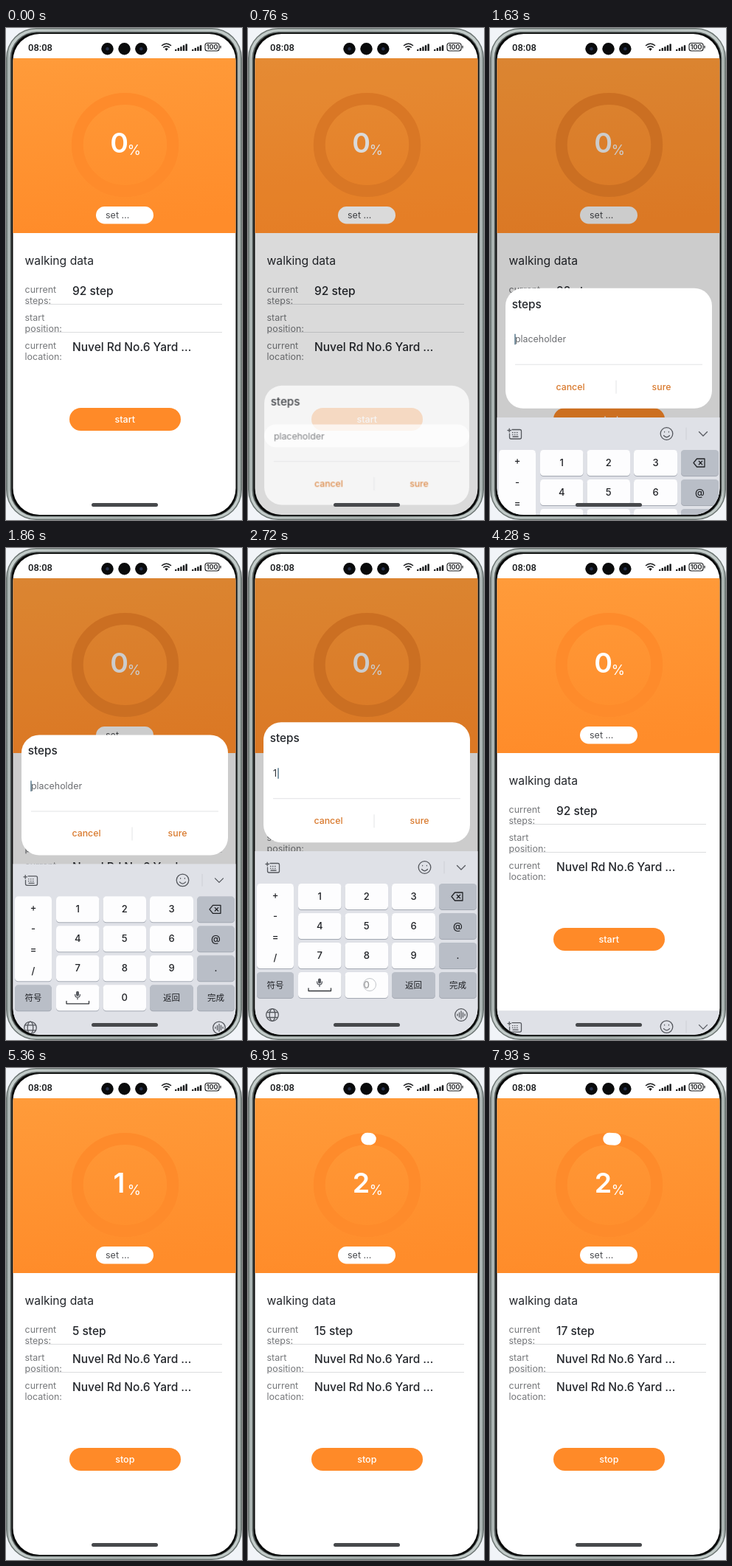
An HTML page for the animation above (8 s loop, 320 by 667 pixels).

```html
<!DOCTYPE html>
<html lang="en">
<head>
<meta charset="utf-8">
<title>Walking tracker</title>
<style>
html, body { margin: 0; width: 100%; height: 100%; overflow: hidden; background: #f1f4f8; }
svg { display: block; width: 320px; height: 667px; }
text { font-family: Inter, Roboto, "Noto Sans", sans-serif; white-space: pre; }
.small { font-size: 12.5px; }
.label { fill: #76787b; }
.value { font-size: 15.5px; font-weight: 500; fill: #23262b; }
.link { font-size: 12.3px; font-weight: 500; fill: #d97a2e; }
.mid { text-anchor: middle; }
.key { font-size: 13px; font-weight: 500; fill: #202226; text-anchor: middle; }
.cjk { font: 500 11.5px "Noto Sans CJK SC", "Noto Sans CJK", sans-serif; }
.clock { font: 500 13px Roboto, "Liberation Sans", sans-serif; fill: #16181a; }
.ico { fill: none; stroke: #55585e; stroke-width: 1.3; stroke-linecap: round; stroke-linejoin: round; }
</style>
</head>
<body>
<svg viewBox="0 0 320 667">
  <defs>
    <linearGradient id="sun" x1="0" y1="0" x2=".12" y2="1">
      <stop offset="0" stop-color="#ff9b3a"/><stop offset="1" stop-color="#ff8c2a"/>
    </linearGradient>
    <linearGradient id="metal">
      <stop offset="0" stop-color="#8f9997"/><stop offset=".012" stop-color="#c5cecc"/>
      <stop offset=".5" stop-color="#a6afad"/>
      <stop offset=".988" stop-color="#c5cecc"/><stop offset="1" stop-color="#8f9997"/>
    </linearGradient>
    <clipPath id="screen"><rect x="9.5" y="8" width="302" height="652" rx="36"/></clipPath>
  </defs>

  <rect width="320" height="667" rx="41" fill="#6d7674"/>
  <rect x="1.5" y="1.5" width="317" height="664" rx="39.5" fill="url(#metal)"/>
  <rect x="5.5" y="5" width="309" height="657.5" rx="36" fill="#59605f"/>
  <rect x="7.5" y="6.5" width="305.5" height="655" rx="34" fill="#080909"/>

  <g clip-path="url(#screen)">
    <rect x="9" y="8" width="303" height="653" fill="#fff"/>
    <rect id="banner" x="9" y="41" width="303" height="237" fill="url(#sun)"/>
    <g id="gauge">
      <ellipse cx="161.5" cy="158.5" rx="64.7" ry="62.5" fill="none" stroke="#fe8b2b" stroke-width="16"/>
      <path id="arc" fill="none" stroke="#fff" stroke-width="16.5" stroke-linecap="round"/>
      <text id="percent" class="mid" x="153.5" y="169" font-size="37.5" font-weight="600" fill="#fff">0</text>
      <text x="164.7" y="171.5" font-size="18.5" fill="#fff">%</text>
      <rect x="122" y="242" width="78" height="23.5" rx="11.7" fill="#fff"/>
      <text class="small" x="135" y="258" fill="#4a4c50">set …</text>
    </g>

    <text x="25.5" y="320.5" font-size="15.7" fill="#23262b">walking data</text>
    <path d="M26 374.5H293M26 412.5H293" stroke="#dcdddf"/>
    <g class="small label">
      <text x="25.5" y="359">current</text><text x="25.5" y="373.5">steps:</text>
      <text x="25.5" y="397">start</text><text x="25.5" y="411.5">position:</text>
      <text x="25.5" y="435">current</text><text x="25.5" y="449.5">location:</text>
    </g>
    <text id="steps" class="value" x="90" y="362">92 step</text>
    <text id="origin" class="value" x="90" y="400"></text>
    <text id="place" class="value" x="90" y="438"></text>
    <rect x="86" y="515" width="151" height="31" rx="15.5" fill="#ff8a28"/>
    <text id="button" class="small mid" x="161.3" y="535" fill="#fff" font-weight="500">start</text>

    <rect id="dim" x="9" y="278" width="303" height="383" fill="#000"/>

    <g id="dialog">
      <rect class="veil" x="21" width="280" height="163" rx="24" fill="#fff"/>
      <rect class="veil" x="21" y="53" width="280" height="31" rx="15.5" fill="#fff"/>
      <g id="content">
        <text x="29.7" y="27" font-size="15.3" font-weight="500" fill="#23262b">steps</text>
        <text id="field" x="34" y="73.5" font-size="12.4"></text>
        <path id="caret" d="M0 62V76.5" stroke="#2f5870" stroke-width="1.2"/>
        <path d="M34 103.5H288M171 125V143" stroke="#e2e3e5"/>
        <text class="link mid" x="109" y="138">cancel</text>
        <text class="link mid" x="232.5" y="138">sure</text>
      </g>
    </g>

    <g id="keyboard"></g>
    <rect x="116" y="644" width="90" height="5" rx="2.5" fill="#47494c"/>

    <text class="clock" x="30" y="31">08:08</text>
    <g id="status"></g>
  </g>
</svg>
<script>
const LOOP = 8000;
const ADDRESS = 'Nuvel Rd No.6 Yard …';
const $ = id => document.getElementById(id);
const part = (t, start, length) => Math.min(1, Math.max(0, (t - start) / length));
const easeOut = (x, power) => 1 - (1 - x) ** power;
const set = (id, name, value) => $(id).setAttribute(name, value);
const say = (id, text) => { if ($(id).textContent !== text) $(id).textContent = text; };
const shade = (id, amount) => { $(id).style.filter = amount > 0 ? `brightness(${1 - amount})` : 'none'; };
// Latest value of a [time, value] table.
const at = (table, t) => table.reduce((value, row) => t >= row[0] ? row[1] : value, table[0][1]);

const STEPS = [[0, 92], [5050, 0], [5360, 5], [5910, 8], [6390, 12], [6910, 15], [7380, 16], [7930, 17]];
const PERCENT = [[0, 0], [5360, 1], [6910, 2]];
const TYPED = [[0, ''], [2720, '1'], [2800, '10'], [3040, '100'], [3170, '1000']];
const TOUCH = [[0, 0], [2720, 1], [2800, 0], [2960, 2], [3040, 0], [3100, 2], [3170, 0]];
const CARET = { '': 34, '1': 41, '10': 48.5, '100': 56.5, '1000': 64.5 };

function buildStatus() {
  let out = '';
  for (const x of [137.5, 160.5, 183.3])
    out += `<circle cx="${x}" cy="28.3" r="8.2" fill="#090a0b"/>`;
  out += '<circle cx="137.5" cy="28.3" r="2.2" fill="#26304a"/><circle cx="183.3" cy="28.3" r="2.2" fill="#26304a"/>';
  out += '<g fill="none" stroke="#16181a" stroke-width="1.4">' +
    '<path d="M211 24Q217.5 18.5 224 24M213.2 26.5Q217.5 22.8 221.8 26.5"/></g>' +
    '<path d="M215.2 28.2Q217.5 26.4 219.8 28.2L217.5 31Z" fill="#16181a"/>';
  for (const [x, n] of [[229, 5], [252, 4]])
    for (let i = 0; i < n; i++) {
      const h = 2 + i * 1.9;
      out += `<rect x="${x + i * 3.6}" y="${31 - h}" width="2.4" height="${h}" rx=".6" fill="#16181a"/>`;
    }
  out += '<rect x="270" y="20.5" width="19" height="10.5" rx="3" fill="none" stroke="#16181a" stroke-width="1.1"/>' +
    '<path d="M291 24V27.5" stroke="#16181a" stroke-width="1.2"/>' +
    '<text class="mid" x="279.5" y="29" font-size="9" font-weight="600" fill="#16181a">100</text>';
  $('status').innerHTML = out;
}

function buildKeyboard() {
  const WHITE = '#fdfdfe', GRAY = '#b9bec7';
  const cols = [[12, 50], [68, 58.5], [131.5, 58.5], [195, 59], [259, 51]];
  const rowY = row => 455 + row * 40;
  const key = (col, row, fill, label = '', kind = '', height = 35) => {
    const [x, w] = cols[col], y = rowY(row);
    return `<rect x="${x}" y="${y + 1}" width="${w}" height="${height}" rx="4.5" fill="#a3a8b2"/>` +
      `<rect class="cap" x="${x}" y="${y}" width="${w}" height="${height}" rx="4.5" fill="${fill}"/>` +
      `<text class="key ${kind}" x="${x + w / 2}" y="${y + (kind ? 21.5 : 22)}">${label}</text>`;
  };
  let out = '<rect x="9" y="411" width="303" height="260" fill="#dfe1e7"/>';
  out += key(0, 0, WHITE, '', '', 115);
  ['+', '-', '=', '/'].forEach((c, i) => out += `<text class="key" x="37" y="${474.5 + i * 28.6}">${c}</text>`);
  for (let n = 1; n < 10; n++) out += key(1 + (n - 1) % 3, Math.floor((n - 1) / 3), WHITE, n);
  out += key(4, 0, GRAY) + key(4, 1, GRAY, '@') + key(4, 2, GRAY, '.');
  out += key(0, 3, GRAY, '符号', 'cjk') + key(1, 3, WHITE);
  out += `<g id="zero">${key(2, 3, WHITE, 0)}</g>`;
  out += key(3, 3, GRAY, '返回', 'cjk') + key(4, 3, GRAY, '完成', 'cjk');

  out += '<g class="ico">' +
    // toolbar: keypad, smiley, chevron
    '<path d="M30 427.5H40.5Q42.5 427.5 42.5 429.5V438Q42.5 440 40.5 440H28.5Q26.5 440 26.5 438V433M24 428.5H28.5M26.2 426.2V430.8"/>' +
    '<path d="M30.5 431.5H39.5M30.5 434.3H39.5" stroke-dasharray=".5 2.5"/><path d="M31 437H38"/>' +
    '<circle cx="239.5" cy="433" r="8.3"/><path d="M235.5 435.5Q239.5 440 243.5 435.5M236.6 430.3V430.8M242.4 430.3V430.8"/>' +
    '<path d="M266 425V441" stroke="#cdd0d6" stroke-width="1"/><path d="M283.5 430.5L289 436L294.5 430.5"/>' +
    // backspace
    '<path d="M276 472.5L280.5 467H291V478H280.5ZM283.3 470.3L287.7 474.7M287.7 470.3L283.3 474.7" stroke="#202226"/>' +
    // microphone over the space bar
    '<path d="M82 597V600.5H112.5V597" stroke="#33363a"/>' +
    '<path d="M93.6 588Q93.6 592 97 592T100.4 588M97 592V594.5"/>' +
    // globe and voice
    '<circle cx="33" cy="633" r="8.3"/><ellipse cx="33" cy="633" rx="3.8" ry="8.3"/><path d="M25.8 629.5H40.2M25.8 636.5H40.2"/>' +
    '<circle cx="289" cy="633" r="8.3"/><path d="M284 632V634M286.5 630V636M289 628V638M291.5 630V636M294 632V634"/></g>' +
    '<rect x="95" y="583.5" width="4" height="7" rx="2" fill="#55585e"/>' +
    '<circle id="touch" cx="165" cy="592" r="8.5" fill="#fff" fill-opacity=".55" stroke="#c3c6cb"/>';
  $('keyboard').innerHTML = out;
}

function drawArc(p) {
  const a = p / 100 * 2 * Math.PI;
  const x = 161.5 + 64.7 * Math.sin(a), y = 158.5 - 62.5 * Math.cos(a);
  set('arc', 'd', p > 0 ? `M161.5 96A64.7 62.5 0 0 1 ${x} ${y}` : '');
}

function drawDialog(t, lift) {
  const into = part(t, 600, 400), out = part(t, 3780, 320);
  const alpha = easeOut(into, 2.5) * (1 - out ** 3);
  const scale = 0.9 + 0.1 * easeOut(into, 5) - 0.095 * easeOut(out, 2);
  const dim = 0.2 * alpha;
  // The saturated banner darkens less than the rest of the page.
  shade('banner', 0.7 * dim);
  shade('gauge', dim);
  set('dim', 'opacity', dim);
  set('dialog', 'visibility', alpha > 0 ? 'visible' : 'hidden');
  set('dialog', 'transform', `translate(161 ${565.7 - lift}) scale(${scale}) translate(-161 -81.5)`);
  veils.forEach(v => v.setAttribute('opacity', alpha));
  set('content', 'opacity', Math.sqrt(alpha));

  const typed = at(TYPED, t);
  say('field', typed || 'placeholder');
  set('field', 'fill', typed ? '#2b2e33' : '#6b6d71');
  set('caret', 'transform', `translate(${CARET[typed]} 0)`);
  set('caret', 'opacity', t >= 1550 && t < 3740 ? 1 : 0);
}

function draw(t) {
  const rise = t < 1540 ? 0 : 1 - Math.exp(-0.0083 * (t - 1540));
  const fall = easeOut(part(t, 4070, 430), 3);
  drawDialog(t, 248 * rise);
  set('keyboard', 'transform', `translate(0 ${249 * (1 - rise * (1 - fall))})`);
  set('keyboard', 'visibility', t >= 1540 && fall < 1 ? 'visible' : 'hidden');

  const touch = at(TOUCH, t);
  set('touch', 'opacity', touch ? 1 : 0);
  zeroCap.setAttribute('fill', touch === 2 ? '#e6e8ec' : '#fdfdfe');

  const walking = t >= 5050;
  say('steps', at(STEPS, t) + ' step');
  say('percent', String(at(PERCENT, t)));
  say('origin', walking ? ADDRESS : '');
  say('button', walking ? 'stop' : 'start');
  drawArc(easeOut(part(t, 5400, 270), 2) + easeOut(part(t, 7340, 430), 2));
}

buildStatus();
buildKeyboard();
say('place', ADDRESS);
const veils = document.querySelectorAll('.veil');
const zeroCap = document.querySelector('#zero .cap');
const began = performance.now();
function tick() {
  draw((performance.now() - began) % LOOP);
  requestAnimationFrame(tick);
}
tick();
</script>
</body>
</html>
```
